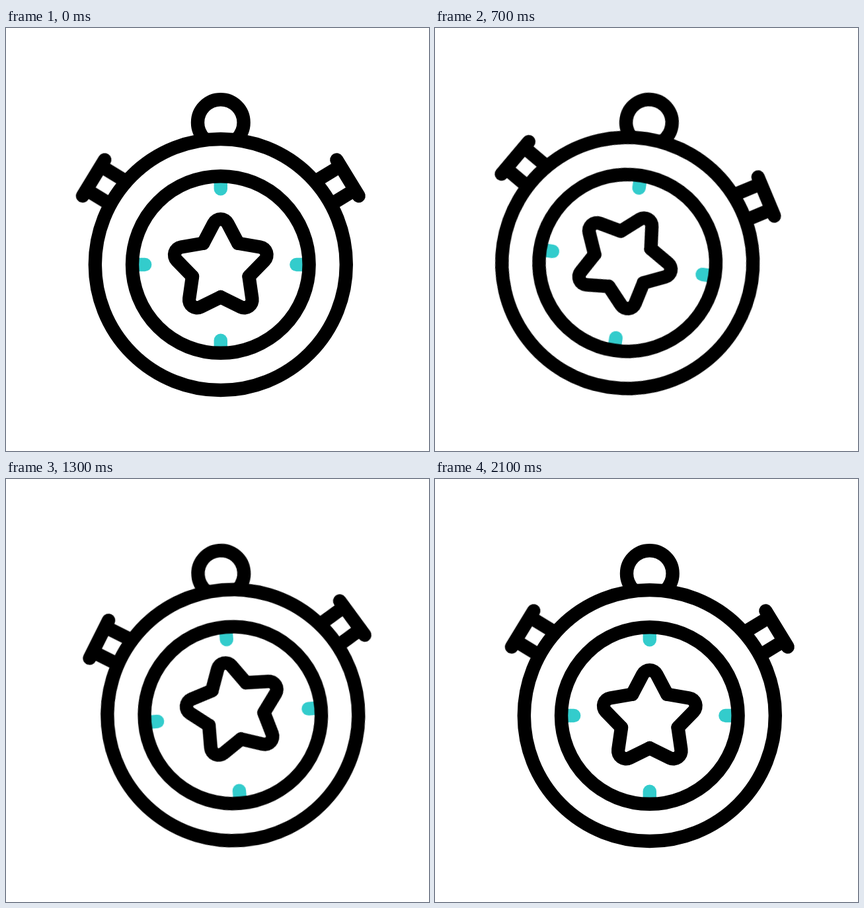
Recreate the animation shown at these times as an HTML page without scripts. Size 640 by 640 pixels, loop 2.12 s.

```html
<!DOCTYPE html>
<html lang="en">
<head>
<meta charset="utf-8">
<title>Swinging stopwatch</title>
<style>
  html, body { margin: 0; width: 100%; height: 100%; overflow: hidden; background: #fff; }
  svg { display: block; width: 100%; height: 100%; }
  .line { fill: none; stroke: #000; stroke-width: 20.4; stroke-linecap: round; stroke-linejoin: round; }
  .disc { fill: #fff; }
  .ticks { stroke: #3cc; }

  .watch {
    transform-origin: 324.8px 137px;
    animation: swing 2120ms cubic-bezier(.333, 0, .667, 1) infinite;
  }
  .star {
    transform-origin: 324.8px 356px;
    animation: spin 2120ms linear infinite;
  }
  /* rest for 210 ms, then three moves of 630 ms each */
  @keyframes swing {
    0%, 9.906% { transform: rotate(0deg); }
    39.623% { transform: rotate(10deg); }
    69.34% { transform: rotate(-8deg); }
    99.057%, 100% { transform: rotate(0deg); }
  }
  @keyframes spin {
    0%, 9.906% { transform: rotate(0deg); }
    99.057%, 100% { transform: rotate(360deg); }
  }
</style>
</head>
<body>
<svg viewBox="0 0 640 640">
  <defs>
    <path id="button" d="M0-32V32M0-21H45M0 21H45" transform="translate(132.6 226.8) rotate(31.4)"/>
    <path id="tick" d="M0-133V-114.6"/>
    <path id="arm" d="M-26.4-36.4L-10.6-66.4A12 12 0 0 1 10.6-66.4L26.4-36.4"/>
  </defs>
  <g class="watch line">
    <circle cx="324.8" cy="143" r="34.8"/>
    <use href="#button"/>
    <use href="#button" transform="translate(649.6) scale(-1 1)"/>
    <circle class="disc" cx="324.8" cy="358" r="190"/>
    <g class="ticks" transform="translate(324.8 358)">
      <use href="#tick"/>
      <use href="#tick" transform="rotate(90)"/>
      <use href="#tick" transform="rotate(180)"/>
      <use href="#tick" transform="rotate(270)"/>
    </g>
    <circle cx="324.8" cy="358" r="133.8"/>
    <g class="star">
      <g transform="translate(324.8 362.1)">
        <use href="#arm"/>
        <use href="#arm" transform="rotate(72)"/>
        <use href="#arm" transform="rotate(144)"/>
        <use href="#arm" transform="rotate(216)"/>
        <use href="#arm" transform="rotate(288)"/>
      </g>
    </g>
  </g>
</svg>
</body>
</html>
```
